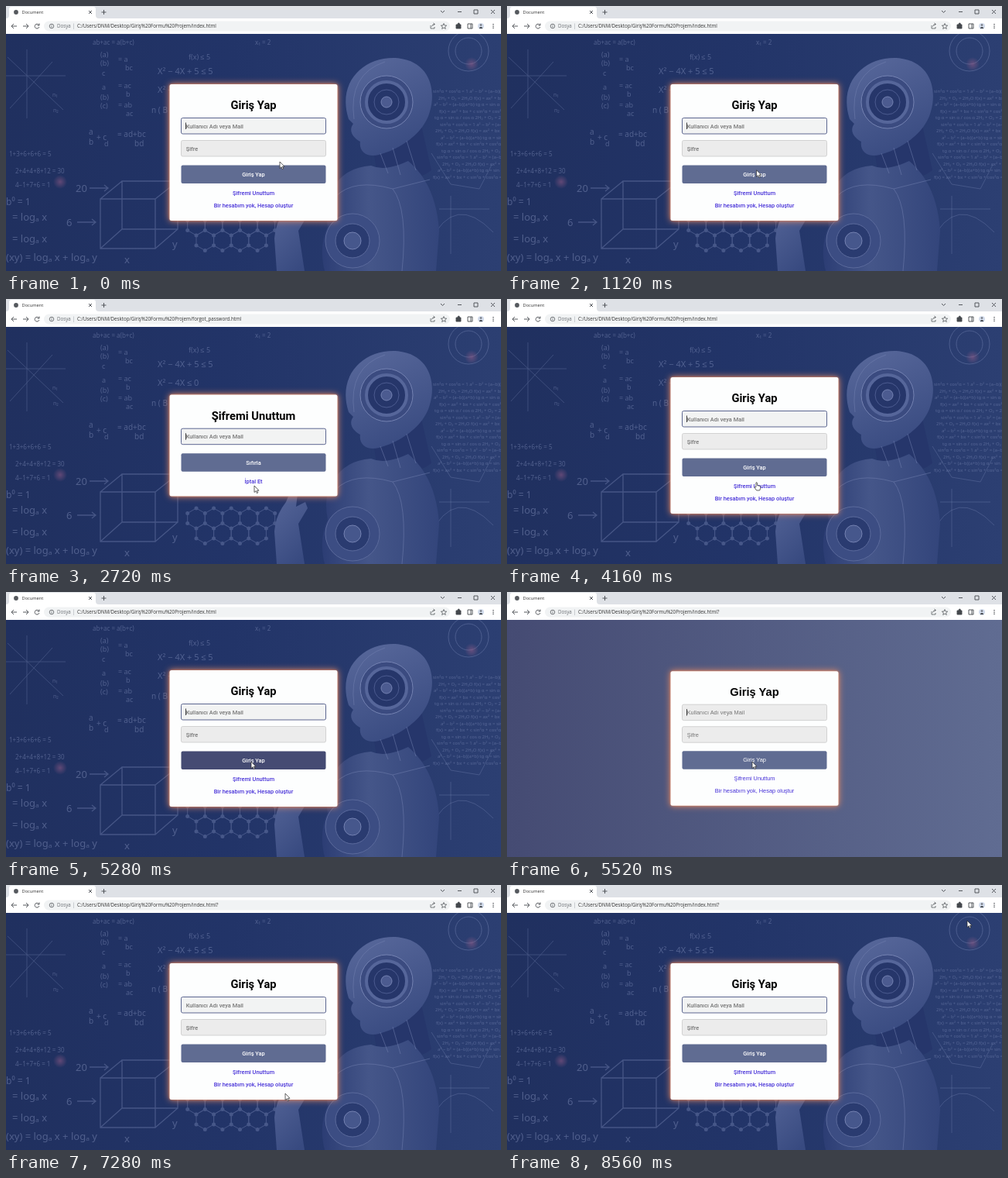
Animation of 640 by 342 pixels, one loop 8.64 s. Source, as an HTML page:

```html
<!DOCTYPE html>
<html lang="tr">
<head>
<meta charset="utf-8">
<title>Document</title>
<style>
  html, body { margin: 0; width: 100%; height: 100%; overflow: hidden; }
  svg { display: block; width: 100vw; height: 100vh; }
  .ui { font-family: "Open Sans", "Noto Sans", sans-serif; font-size: 6.2px; fill: #333; }
  .line { fill: none; stroke: #44484d; stroke-width: .9; }
  .chalk { font-family: "Noto Sans", sans-serif; font-weight: 500; fill: #a3afd8; opacity: .36; }
  .sketch { fill: none; stroke: #9aa7d4; opacity: .3; }
  .styled { font: 500 7.4px Roboto, sans-serif; }
  .plain { font: 400 7.4px "Liberation Sans", Arial, sans-serif; }
  .title { font-size: 14.7px; font-weight: 700; }
  .card { fill: #fdfefe; filter: drop-shadow(0 0 1px #e88a62) drop-shadow(0 0 4px #e88a62); }
  .link { fill: #4630d8; }
</style>
</head>
<body>
<svg viewBox="0 0 640 342" preserveAspectRatio="none">
  <defs>
    <linearGradient id="navy"><stop stop-color="#20305f"/><stop offset=".45" stop-color="#223468"/><stop offset="1" stop-color="#2c3f72"/></linearGradient>
    <linearGradient id="plainBg"><stop stop-color="#454b73"/><stop offset="1" stop-color="#606c92"/></linearGradient>
    <linearGradient id="shell" x1=".3" y1="0" x2=".7" y2="1"><stop stop-color="#566699"/><stop offset="1" stop-color="#384a80"/></linearGradient>
    <linearGradient id="torso"><stop stop-color="#2c3d74"/><stop offset=".4" stop-color="#455689"/><stop offset="1" stop-color="#33457b"/></linearGradient>
    <radialGradient id="spark"><stop stop-color="#a0608a" stop-opacity=".5"/><stop offset="1" stop-color="#a0608a" stop-opacity="0"/></radialGradient>
  </defs>

  <g id="photo">
    <path fill="url(#navy)" d="M0 36H640V342H0z"/>
    <g class="chalk" id="formulas"></g>
    <g class="sketch">
      <path d="M0 90H77M27 56V145M2 66L74 134M5 132L60 72" stroke-width=".8"/>
      <path d="M122 249H193V313H122zM150 226H222V288H150zM122 249L150 226M193 249L222 226M122 313L150 288M193 313L222 288M108 235H132M127 231L132 235L127 239M92 279H116M111 275L116 279L111 283" stroke-width="1.3"/>
      <path id="cells"/>
      <path id="atoms" stroke-width="5" stroke-linecap="round"/>
      <circle cx="598" cy="58" r="26"/><circle cx="598" cy="58" r="17"/>
      <path d="M550 190L575 230L612 236L628 205M560 262H625M575 245V320M548 305Q580 240 630 292" stroke-width=".8"/>
    </g>
    <circle cx="70" cy="227" r="9" fill="url(#spark)"/><circle cx="602" cy="75" r="9" fill="url(#spark)"/>
    <path fill="#26366b" d="M474 178L536 150L550 212Q525 232 480 218z"/>
    <path fill="url(#torso)" d="M422 236Q438 208 472 206Q490 214 520 200Q556 230 560 290L556 342H412Q404 310 416 285Q410 255 422 236z"/>
    <path fill="url(#shell)" d="M443 146C428 100 460 66 503 67C546 69 557 106 548 136C541 163 512 184 482 192C467 196 456 188 458 175C447 169 443 160 449 152z"/>
    <path fill="url(#shell)" d="M350 342L347 300Q348 280 362 262L372 238L378 243L375 268L387 262L390 270L378 290L386 342z"/>
    <g fill="none" stroke="#7482b2">
      <circle cx="492" cy="124" r="34" fill="#3b4b80"/><circle cx="492" cy="124" r="26" fill="#26366a" stroke="#56669a" stroke-width="4"/>
      <circle cx="492" cy="124" r="16" stroke="#4c5b90"/><circle cx="492" cy="124" r="7" fill="#4c5b90"/>
      <circle cx="448" cy="303" r="35" fill="#3c4d83" stroke="#5b6a9c"/><circle cx="448" cy="303" r="22" fill="#2a3b70" stroke="#5b6a9c"/><circle cx="448" cy="303" r="11" fill="#46578c"/>
      <path d="M450 146Q442 88 490 72M484 190L494 216M500 183L510 218M518 174L530 212M426 246Q450 222 500 236Q520 262 512 342M500 236L548 224" opacity=".5"/>
    </g>
  </g>
  <path id="flash" fill="url(#plainBg)" d="M0 36H640V342H0z"/>

  <path fill="#dee1e6" d="M0 0H640V16H0z"/>
  <path fill="#fff" d="M0 16Q4 16 4 12V4Q4 1 7 1H113Q116 1 116 4V12Q116 16 120 16H640V36H0z"/>
  <rect x="49" y="19.5" width="525" height="13" rx="6.5" fill="#f1f3f4"/>
  <g class="ui">
    <text x="20.5" y="10.2" font-size="5.7">Document</text>
    <text x="66" y="28.3" fill="#6b6f74">Dosya</text>
    <path d="M87.5 22.5V30" stroke="#b8bcc0" stroke-width=".7"/>
    <text id="url" x="92" y="28.3"></text>
  </g>
  <g class="line">
    <path d="M107 6L111 10M111 6L107 10M126.5 5V11M123.5 8H129.5M562 6L564.500 8.500L567 6M584 7.500H589M605 5H610V10H605zM627 5L632 10M632 5L627 10"/>
    <path d="M14 26H7M10 23L7 26L10 29M22 26H29M26 23L29 26L26 29"/>
    <circle cx="59" cy="26" r="2.800" stroke-width=".7"/><path d="M59 25.500V27.500M59 24.200V24.800" stroke-width=".7"/>
    <path d="M549 25V29H554V27M550.500 26.500Q551 23.500 554 23.500M552.500 22L554.500 23.500L552.500 25" stroke-width=".7"/>
    <path d="M566 22.500L567 25L569.700 25.200L567.600 26.900L568.300 29.500L566 28L563.700 29.500L564.400 26.900L562.300 25.200L565 25z" stroke-width=".7"/>
    <path d="M582 24H584Q584 22 585.300 22T586.500 24H588V29H582z" fill="#44484d"/>
    <path d="M597 23H603V29H597zM601 23V29"/>
    <circle cx="614" cy="26" r="4" fill="#d3dcec" stroke="none"/><path d="M612 28.500Q614 26 616 28.500z" fill="#44484d"/><circle cx="614" cy="24.500" r=".8"/>
    <path d="M630 23V24.300M630 25.400V26.700M630 27.800V29.100" stroke-width="1.300"/>
    <path id="reload"/>
  </g>
  <circle cx="13" cy="8" r="2.900" id="icon" fill="#55595e"/>
  <path id="spin" d="M13 4.500A3.500 3.500 0 1 1 9.500 8" fill="none" stroke="#3f72d8"/>

  <g id="page"></g>
  <path id="cursor" stroke-linejoin="round"/>
</svg>

<script>
const LOOP = 8640, STEP = 80, MID = 189, BLINK = 1060;
const $ = id => document.getElementById(id);
const label = (x, y, s, extra = '') => `<text x="${x}" y="${y}" ${extra}>${s}</text>`;

// Background writing: x, baseline, size, text
$('formulas').innerHTML = [
  [112, 50, 8, 'ab+ac = a(b+c)'], [236, 69, 9, 'f(x) ≤ 5'], [196, 88, 11, 'X² − 4X + 5 ≤ 5'], [196, 112, 11, 'X² − 4X ≤ 0'],
  [122, 66, 9, '(a)'], [122, 77, 9, '(b)'], [124, 90, 9, 'c'], [145, 72, 9, '= a'], [154, 83, 9, 'bc'],
  [124, 108, 9, 'a'], [145, 106, 9, '= ac'], [155, 117, 9, 'b'],
  [122, 121, 9, '(b)'], [122, 132, 9, '(c)'], [145, 131, 9, '= ab'], [155, 142, 9, 'ac'],
  [107, 166, 10, 'a'], [107, 179, 10, 'b'], [117, 173, 10, '+ c'], [127, 181, 9, 'd'],
  [144, 169, 10, '= ad+bc'], [166, 181, 10, 'bd'], [188, 138, 10, 'n ( B'],
  [4, 194, 8, '1+3+6+6+6 = 5'], [12, 216, 8, '2+4+4+8+12 = 30'], [12, 234, 8, '4−1+7+6 = 1'],
  [90, 240, 13, '20'], [78, 284, 13, '6'], [153, 332, 13, 'x'], [215, 312, 13, 'y'],
  [0, 257, 12, 'b⁰ = 1'], [8, 277, 13, '= logₐ x'], [8, 305, 13, '= logₐ x'], [0, 329, 13, '(xy) = logₐ x + logₐ y'],
  [322, 50, 8, 'x₁ = 2'], [60, 117, 7, 'n₁'], [61, 137, 7, 'n₂']
].map(([x, y, size, s]) => label(x, y, s, `font-size="${size}"`)).join('');

// Dense small writing on the right
const NOTES = ['sin²α + cos²α = 1', '2H₂ + O₂ = 2H₂O', 'a² − b² = (a−b)(a+b)', 'f(x) = ax² + bx + c', 'tg α = sin α / cos α'];
for (let i = 0; i < 14; i++)
  $('formulas').innerHTML += label(552 + i * 7 % 13, 112 + i * 8.5, NOTES[i % 5] + ' ' + NOTES[(i + 2) % 5], 'font-size="6"');

// Molecule lattice with a dot on each atom
const hexagon = (cx, cy, r) => Array.from({ length: 6 }, (_, i) =>
  `${(cx + r * Math.sin(i * Math.PI / 3)).toFixed(1)} ${(cy + r * Math.cos(i * Math.PI / 3)).toFixed(1)}`);
const cells = Array.from({ length: 9 }, (_, i) => hexagon(246 + i * 11.3, 283 + i % 2 * 19.5, 13));
$('cells').setAttribute('d', [...cells, hexagon(462, 228, 14)].map(c => `M${c.join('L')}z`).join(''));
$('atoms').setAttribute('d', [...new Set(cells.flat())].map(p => `M${p}h0`).join(''));

const NAME = 'Kullanıcı Adı veya Mail';
const VIEWS = {
  login: {
    top: 101, title: ['Giriş Yap', 133], inputs: [[144.5, NAME], [173.5, 'Şifre']], button: [205.5, 'Giriş Yap'],
    links: [['Şifremi Unuttum', 243.7, 27], ['Bir hesabım yok, Hesap oluştur', 260, 52]]
  },
  forgot: {
    top: 123.5, title: ['Şifremi Unuttum', 156], inputs: [[167.2, NAME]], button: [199.3, 'Sıfırla'],
    links: [['İptal Et', 238, 12]]
  }
};

// start, view, address, state, time the view was loaded
const SCENES = [
  [0, 'login', 'index.html', '', -STEP],
  [2480, 'login', 'forgot_password.html', 'loading', -STEP],
  [2640, 'forgot', 'forgot_password.html', 'flash', 2640],
  [2720, 'forgot', 'forgot_password.html', '', 2640],
  [3920, 'forgot', 'index.html', 'loading', 2640],
  [4080, 'login', 'index.html', '', 4080],
  [5360, 'login', 'index.html?', 'loading', 4080],
  [5520, 'login', 'index.html?', 'flash', 5520],
  [5600, 'login', 'index.html?', '', 5520]
];

// Pointer stops: time, x, y
const PATH = [
  [0, 354, 201], [480, 336, 155], [800, 328, 184], [1200, 322, 215], [1520, 320, 238], [1760, 320, 238],
  [1960, 326, 256], [2160, 321, 241], [2720, 321, 241], [3200, 318, 212], [3760, 323, 237], [4160, 322, 237],
  [4480, 324, 255], [5040, 317, 219], [5920, 317, 219], [6080, 317, 212], [6160, 318, 188],
  [6400, 318, 155], [6800, 320, 240], [7040, 330, 258], [7200, 344, 281], [7680, 574, 120],
  [8160, 595, 46], [LOOP, 595, 46]
];

const CURSORS = {
  arrow: ['M0 0V8.500L2 6.700L3.400 9.700L4.800 9L3.400 6.200H6z', '#fff', '#222', .7],
  hand: ['M0 0Q1.200 -.8 1.600 .3V3.500L5.400 4.500Q6 5 5.600 7.500L4.700 10H.6L-2 6.200Q-1.800 5 -.2 6z', '#fff', '#222', .7],
  beam: ['M-1.500 -4H1.500M0 -4V4M-1.500 4H1.500', 'none', '#333', .8]
};

function pointer(t) {
  const i = PATH.findIndex(p => p[0] > t);
  const [t0, x0, y0] = PATH[i - 1], [t1, x1, y1] = PATH[i];
  const u = (t - t0) / (t1 - t0), e = u * u * (3 - 2 * u);
  return [x0 + (x1 - x0) * e, y0 + (y1 - y0) * e];
}

// What lies under the pointer: "beam", "button", a link index, or null
function hit(view, [x, y]) {
  const wide = x > 226 && x < 414;
  if (wide && view.inputs.some(([top]) => y > top && y < top + 21)) return 'beam';
  if (wide && y > view.button[0] && y < view.button[0] + 23.5) return 'button';
  const i = view.links.findIndex(([, base, half]) => Math.abs(x - 320) < half && y > base - 8 && y < base + 2);
  return i < 0 ? null : i;
}

const blend = (a, b, u) => `rgb(${a.map((v, i) => Math.round(v + (b[i] - v) * u))})`;

function drawPage(view, { flash, focused, caret, heat, over }) {
  const Y = y => MID + (y - MID) * (flash ? .985 : 1);
  const mid = 'text-anchor="middle"';
  const box = (y, h, attrs) => `<rect x="226.500" y="${Y(y)}" width="187" height="${h}" rx="2" ${attrs}/>`;
  const [title, titleY] = view.title, [btnY, btnText] = view.button;
  let s = `<rect class="card" x="211.500" y="${Y(view.top)}" width="217" height="${2 * (MID - Y(view.top))}" rx="2.500"/>`;
  s += label(320, Y(titleY), title, `class="title" ${mid}`);
  view.inputs.forEach(([y, text], i) => {
    const lit = focused && !i && !flash;
    s += box(y, 20.5, lit ? 'fill="#f2f3f3" stroke="#5c6690"' : 'fill="#ececec" stroke="#c9c9c9" stroke-width=".8"');
    s += label(232.7, Y(y + 13), text, 'fill="#757575"');
    if (!i && caret) s += `<path d="M232.500 ${Y(y + 6)}v8.500" stroke="#111" stroke-width=".8"/>`;
  });
  s += box(btnY, 23.5, `fill="${blend([96, 108, 146], [69, 75, 115], heat)}"`);
  s += label(320, Y(btnY + 14.4), btnText, `fill="#fff" ${mid}`);
  view.links.forEach(([text, y], i) => {
    s += label(320, Y(y), text, `class="link" ${mid} ${over === i ? 'text-decoration="underline"' : ''}`);
  });
  $('page').setAttribute('class', flash ? 'plain' : 'styled');
  $('page').innerHTML = s;
}

function draw(t) {
  const [, name, file, state, loaded] = SCENES.filter(s => s[0] <= t).pop();
  const view = VIEWS[name], flash = state === 'flash', loading = state === 'loading';
  const at = pointer(t), over = hit(view, at);
  const heat = [t - STEP, t - 2 * STEP].filter(p => p >= Math.max(loaded, 0) && hit(view, pointer(p)) === 'button').length / 2;
  const focused = !loading;
  const caret = focused && (t - loaded) % BLINK < BLINK / 2;
  drawPage(view, { flash, focused, caret, heat, over: t - loaded < 2 * STEP ? null : over });

  $('flash').style.display = flash ? '' : 'none';
  $('url').textContent = 'C:/Users/DNM/Desktop/Giriş%20Formu%20Projem/' + file;
  $('reload').setAttribute('d', loading ? 'M37.500 23.500L42.500 28.500M42.500 23.500L37.500 28.500'
    : 'M42.500 24.500A2.900 2.900 0 1 0 42.900 27M43 22.500V25H40.500');
  $('spin').style.display = loading ? '' : 'none';
  $('spin').setAttribute('transform', `rotate(${t} 13 8)`);
  $('icon').setAttribute('r', loading ? 2 : 2.9);

  const kind = over === 'beam' ? 'beam' : typeof over === 'number' && !loading ? 'hand' : 'arrow';
  const [d, fill, stroke, width] = CURSORS[kind];
  const attrs = { d, fill, stroke, 'stroke-width': width, transform: `translate(${at})` };
  for (const key in attrs) $('cursor').setAttribute(key, attrs[key]);
}

const start = performance.now();
let last = -1;
function tick() {
  const t = Math.floor((performance.now() - start) % LOOP / STEP) * STEP;
  if (t !== last) draw(last = t);
  requestAnimationFrame(tick);
}
tick();
</script>
</body>
</html>
```
